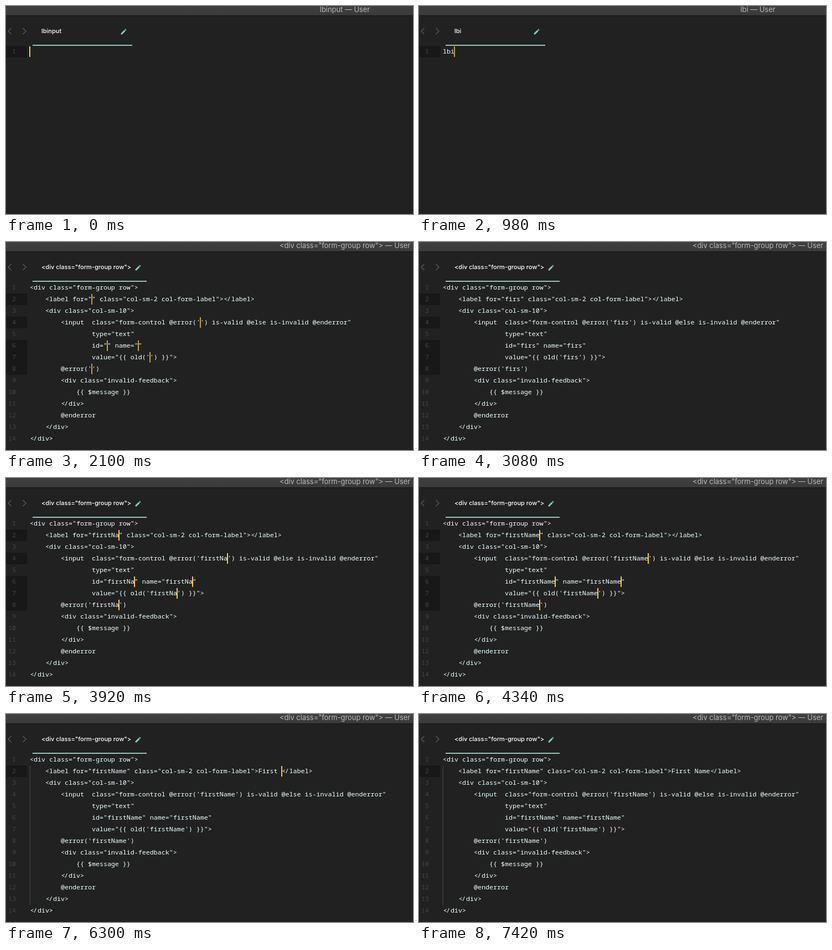
Animation of 735x376 px, one loop 7560 ms. Source, as an HTML page:

```html
<!DOCTYPE html>
<html lang="en">
<head>
<meta charset="utf-8">
<title>Editor snippet</title>
<style>
  html, body { margin: 0; width: 100%; height: 100%; overflow: hidden; background: #212121; }
  #stage { position: relative; width: 735px; height: 376px; overflow: hidden; background: #212121; }
  #stage div, #stage svg { position: absolute; }
  #bar { left: 0; top: 0; width: 735px; height: 17px; background: linear-gradient(#414141, #393939); border-bottom: 1px solid #121212; }
  #title { left: 412px; width: 400px; top: -1px; text-align: center; white-space: pre;
    font: 12.9px/16px Inter, Roboto, sans-serif; color: #b9b9b9; }
  #tab { left: 48px; top: 30px; height: 40px; border-bottom: 2px solid #80cbc4; }
  #name { left: 16px; top: 5px; white-space: pre; font: 500 11px/20px Inter, Roboto, sans-serif; color: #fff; }
  #pen { right: 9.5px; top: 9.5px; fill: #80cbc4; }
  #nav { left: 0; top: 36px; fill: none; stroke: #555; stroke-width: 1.5; }
  .row { left: 0; width: 735px; height: 21px; white-space: pre;
    font: 11.667px/21px "Noto Sans Mono", "DejaVu Sans Mono", monospace; font-variant-ligatures: none; }
  .num { left: 0; top: 0; width: 38px; height: 21px; color: #444; }
  .num span { position: absolute; top: -1px; right: 20px; }
  .on { background: #181818; }
  .code { left: 43px; top: -1px; color: #eff; }
  .lig { letter-spacing: -1.5px; margin: 0 2.25px 0 .75px; }
  .caret { top: 1px; width: 2px; height: 19px; background: #ffcb2b; }
  #guide { left: 43px; top: 93px; width: 1px; height: 252px; background: #454545; }
</style>
</head>
<body>
<div id="stage">
  <div id="bar"></div>
  <div id="title"></div>
  <svg id="nav" width="44" height="20"><path d="M9.5 4 4 9.5 9.5 15M30.5 4 36 9.5 30.5 15"/></svg>
  <div id="tab">
    <div id="name"></div>
    <svg id="pen" width="13" height="13" viewBox="0 0 24 24"><path d="M3 17.25V21h3.75L17.81 9.94l-3.75-3.75zM20.71 7.04a1 1 0 0 0 0-1.41l-2.34-2.34a1 1 0 0 0-1.41 0l-1.83 1.83 3.75 3.75z"/></svg>
  </div>
  <div id="guide"></div>
  <div id="rows"></div>
</div>
<script>
const LOOP = 7560, STEP = 140, CHAR = 7, LINE = 21, TOP = 72;
const $ = id => document.getElementById(id);

// ~ marks the linked field, ^ marks the label text
const SNIPPET = [
  '<div class="form-group row">',
  '    <label for="~" class="col-sm-2 col-form-label">^</label>',
  '    <div class="col-sm-10">',
  '        <input  class="form-control @error(\'~\') is-valid @else is-invalid @enderror"',
  '                type="text"',
  '                id="~" name="~"',
  '                value="{{ old(\'~\') }}">',
  '        @error(\'~\')',
  '        <div class="invalid-feedback">',
  '            {{ $message }}',
  '        </div>',
  '        @enderror',
  '    </div>',
  '</div>'
];
const FIELD = 'firstName', LABEL = 'First Name';

// [time, mode, characters typed]
const KEYS = [
  [0, 'word', 0], [420, 'word', 1], [560, 'word', 2], [700, 'word', 3],
  [1120, 'word', 4], [1260, 'word', 5], [1400, 'word', 6], [1540, 'word', 7],
  [1820, 'field', 0], [2240, 'field', 1], [2380, 'field', 3], [2520, 'field', 4],
  [3220, 'field', 5], [3780, 'field', 6], [3920, 'field', 7], [4060, 'field', 8], [4200, 'field', 9]
];
for (let i = 0; i <= LABEL.length; i++) KEYS.push([5460 + i * STEP, 'label', i]);

// caret opacity by steps since the last key
const BLINK = [1, 1, .75, .35, 0, .5, 1, .85, .4];

const escape = s => s.replace(/&/g, '&amp;').replace(/</g, '&lt;');
const markup = s => escape(s).replace(/&lt;\//g, '<span class="lig">&lt;/</span>');

function fill(line, mode, field, label) {
  const carets = [];
  const target = mode === 'field' ? '~' : '^';
  let text = '';
  for (const c of line) {
    if (c === '~') text += field;
    else if (c === '^') text += label;
    else text += c;
    if (c === target) carets.push(text.length);
  }
  return { text, carets };
}

function rowHtml({ text, carets }, i, alpha) {
  const marks = carets.map(col =>
    `<div class="caret" style="left:${42 + col * CHAR}px;opacity:${alpha}"></div>`).join('');
  return `<div class="row" style="top:${TOP + i * LINE}px">` +
    `<div class="num${carets.length ? ' on' : ''}"><span>${i + 1}</span></div>` +
    `<div class="code">${markup(text)}</div>${marks}</div>`;
}

function draw(t) {
  const [start, mode, count] = KEYS.filter(k => k[0] <= t).pop();
  const alpha = BLINK[Math.floor((t - start) / STEP) % BLINK.length];
  let lines, name;
  if (mode === 'word') {
    const text = 'lbinput'.slice(0, count);
    lines = [{ text, carets: [count] }];
    name = text || (t < STEP ? 'lbinput' : 'untitled');
  } else {
    const field = mode === 'field' ? FIELD.slice(0, count) : FIELD;
    const label = mode === 'label' ? LABEL.slice(0, count) : '';
    lines = SNIPPET.map(s => fill(s, mode, field, label));
    name = SNIPPET[0];
  }
  $('rows').innerHTML = lines.map((l, i) => rowHtml(l, i, alpha)).join('');
  $('name').textContent = name;
  $('title').textContent = name + ' — User';
  $('tab').style.width = (mode === 'word' ? 180 : 206) + 'px';
  $('guide').style.display = mode === 'label' ? 'block' : 'none';
}

const begin = performance.now();
let shown = -1;
function tick() {
  const t = Math.max(0, performance.now() - begin) % LOOP;
  const step = Math.floor(t / STEP);
  if (step !== shown) draw((shown = step) * STEP);
  requestAnimationFrame(tick);
}
tick();
</script>
</body>
</html>
```
